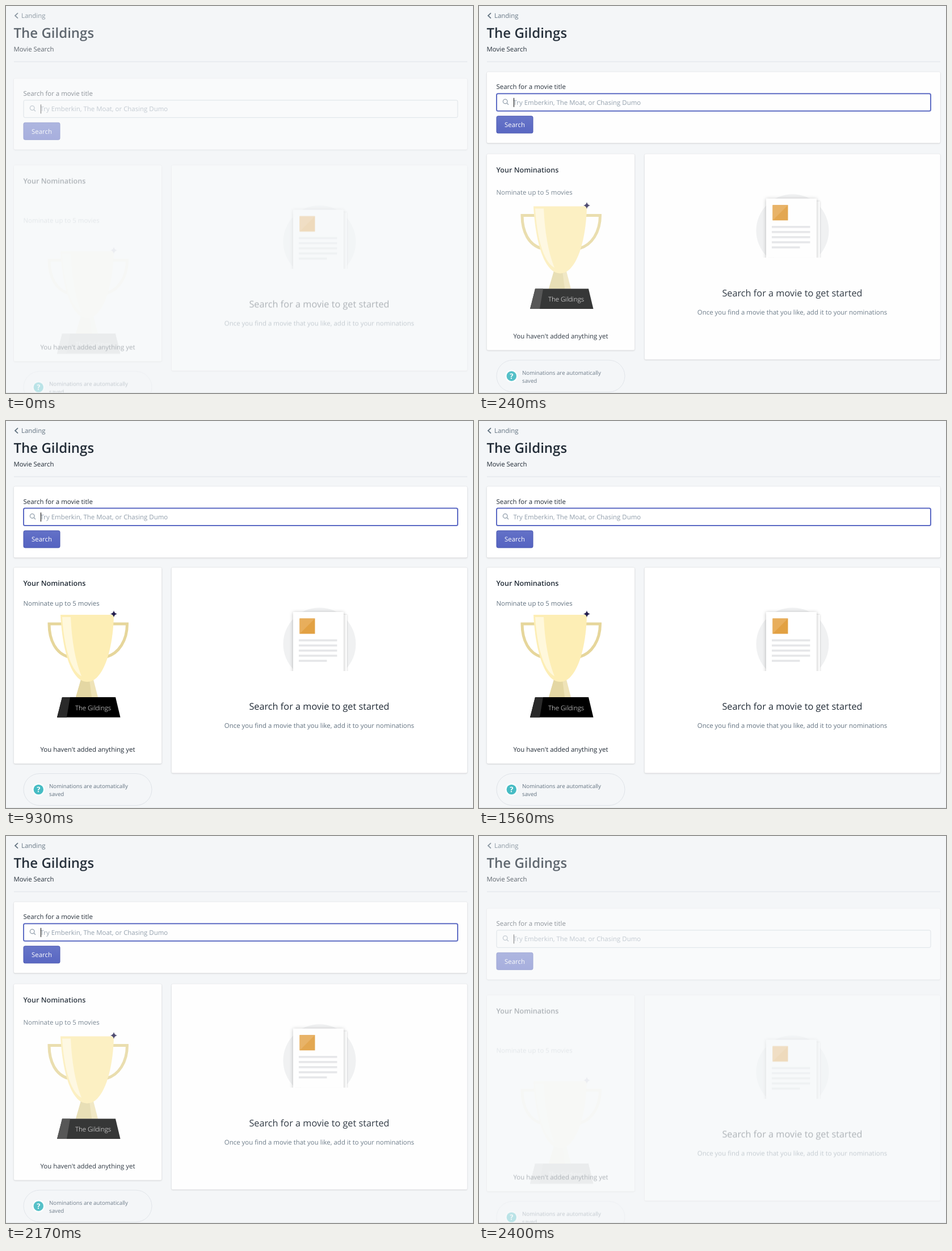
Animation, 823 px wide and 681 px high, one loop 2490 ms. Source, as an HTML page:

```html
<!DOCTYPE html>
<html lang="en">
<head>
<meta charset="utf-8">
<title>Movie search</title>
<style>
  html, body { margin: 0; width: 100%; height: 100%; overflow: hidden; background: #f4f6f8; }
  svg { display: block; width: 823px; height: 681px; }
  text { font: 11.45px "Open Sans", "Noto Sans", sans-serif; fill: #212b36; text-rendering: geometricPrecision; }
  .title { font-size: 24px; font-weight: 600; }
  .heading { font-size: 12.6px; font-weight: 600; }
  .lead { font-size: 16.3px; }
  .small { font-size: 9.73px; }
  .muted { fill: #637381; }
  .hint { fill: #919eab; }
  .light { fill: #fff; }
  .mid { text-anchor: middle; }
  .plaque { font-size: 11.5px; font-weight: 300; }
  .mark { font-size: 13px; font-weight: 700; }
  .card { fill: #fff; stroke: rgba(63, 63, 68, .06); filter: drop-shadow(0 1px 1.2px rgba(63, 63, 68, .17)); }
  .line { fill: none; }
</style>
</head>
<body>
<svg viewBox="0 0 823 681">
  <defs>
    <linearGradient id="buttonFill" x2="0" y2="1">
      <stop stop-color="#6371c7"/><stop offset="1" stop-color="#5563c1"/>
    </linearGradient>
    <clipPath id="paperClip"><rect x="480" y="320" width="150" height="120"/></clipPath>
  </defs>

  <path class="line" d="M14 98H813" stroke="#dfe3e8"/>

  <g id="header">
    <path class="line" d="M21 12.3 16 17l5 4.7" stroke="#637381" stroke-width="1.8"/>
    <text class="muted" x="27" y="21.3">Landing</text>
    <text class="title" x="13.5" y="56">The Gildings</text>
    <text x="13.5" y="79.5">Movie Search</text>
  </g>

  <g id="search">
    <rect class="card" x="13.5" y="115" width="799.5" height="125.5" rx="2.5"/>
    <text x="30.5" y="145.5">Search for a movie title</text>
    <rect x="31" y="153.5" width="765" height="30.5" rx="2.5" fill="#fff" stroke="#c4cdd5"/>
    <rect id="ring" class="line" x="31" y="153.5" width="765" height="30.5" rx="2.5" stroke="#5c6ac4" stroke-width="2"/>
    <g class="line" stroke="#919eab" stroke-width="1.3">
      <circle cx="46.2" cy="167.2" r="3.8"/><path d="m49 170 3 3"/>
    </g>
    <text class="hint" x="60.5" y="173">Try Emberkin, The Moat, or Chasing Dumo</text>
    <rect id="caret" x="61" y="161" width="1" height="16"/>
    <rect x="31" y="193" width="64" height="30" rx="2.5" fill="url(#buttonFill)" stroke="#4755b0"/>
    <text class="light mid" x="63" y="212.3">Search</text>
  </g>

  <g id="panels">
    <rect class="card" x="13.5" y="257.5" width="261" height="345.5" rx="2.5"/>
    <text class="heading" x="30.5" y="290">Your Nominations</text>
    <g id="nominate">
      <text class="muted" x="30.5" y="325.3">Nominate up to 5 movies</text>
      <g id="trophy">
        <g class="line" stroke="#e6d69b" stroke-width="5">
          <path d="M98 357H76C76 386 88 409 110 415"/>
          <path d="M188 357H213.500C213.500 386 199 409 177 415"/>
        </g>
        <path d="M132 455H154L162 486H123Z" fill="#efe3b7"/>
        <path d="M132 455H147L151 486H123Z" fill="#e4d7a3"/>
        <path d="M96 341H190C189 400 172 459 143 459 114 459 99 400 96 341Z" fill="#fdeeb5"/>
        <path d="M99 345H114C116 387 122 422 133 449 112 438 102 392 99 345Z" fill="#fff8dc"/>
        <path d="M99 486H193L201.500 521.500H90Z"/>
        <path d="M99 486H113L107 521.500H90Z" fill="#2a2a2a"/>
        <text class="plaque light mid" x="153.500" y="508.500">The Gildings</text>
        <path d="M190 333.500Q191 338.500 196 339.500 191 340.500 190 345.500 189 340.500 184 339.500 189 338.500 190 333.500Z" fill="#231f4e"/>
      </g>
    </g>
    <text class="mid" x="144" y="582">You haven't added anything yet</text>

    <rect class="card" x="291.5" y="257.5" width="521.5" height="362" rx="2.5"/>
    <g clip-path="url(#paperClip)">
      <circle cx="552.5" cy="392.5" r="64" fill="#f0f1f2"/>
      <path d="M520 341H601V460H520Z" fill="#fff" style="filter:drop-shadow(0 0 1.5px #0003)"/>
      <path d="M506 336H595V460H506Z" fill="#fff" style="filter:drop-shadow(0 1px 3px #0004)"/>
      <path d="M517.500 347.500h27v27h-27Z" fill="#e2a143"/>
      <path d="M517.500 347.500h27l-27 27Z" fill="#e8ae5c"/>
      <path class="line" d="M516 386h67.500M516 395h67.500M516 404h67.500M516 413h67.500M516 422h49.500" stroke="#e5e6e8" stroke-width="3.5"/>
    </g>
    <text class="lead mid" x="552" y="508">Search for a movie to get started</text>
    <text class="muted mid" x="552" y="540">Once you find a movie that you like, add it to your nominations</text>

    <rect class="line" x="31" y="620.5" width="226" height="56" rx="28" stroke="#dfe3e8"/>
    <circle cx="57.3" cy="648.5" r="11" fill="#fff"/>
    <circle cx="57.3" cy="648.5" r="8.7" fill="#47bcc4"/>
    <text class="mark light mid" x="57.3" y="653.2">?</text>
    <text class="small muted" x="76" y="646">Nominations are automatically</text>
    <text class="small muted" x="76" y="660">saved</text>
  </g>

  <path class="line" d="M0 680.5H823" stroke="#e4e7ea"/>
</svg>
<script>
  const LOOP = 2490;
  const REST = 5;
  const ENTER = [90, 160, 240, 320, 390];
  const LEAVE = [2100, 2170, 2250, 2330, 2400];

  // Nested layers: shift in pixels, missing opacity, and steps until settled.
  const LAYERS = [
    { id: "header", shift: 0, fade: 0.3, span: 4.5 },
    { id: "search", shift: 12.3, fade: 0.52, span: 4 },
    { id: "panels", shift: 22.4, fade: 0.67, span: 4.6 },
    { id: "nominate", shift: 34, fade: 0.6, span: 4.7 },
    { id: "trophy", shift: 34, fade: 0.6, span: 4.7 }
  ];

  const byId = id => document.getElementById(id);
  const passed = (times, t) => times.filter(time => t >= time).length;

  function render(t) {
    const step = passed(ENTER, t) - passed(LEAVE, t);
    for (const { id, shift, fade, span } of LAYERS) {
      const left = Math.max(0, 1 - step / span) ** 2;
      const layer = byId(id);
      layer.setAttribute("transform", `translate(0 ${(shift * left).toFixed(2)})`);
      layer.setAttribute("opacity", 1 - fade * left);
    }
    byId("ring").setAttribute("opacity", Math.min(1, step / 1.5));
    const caretOn = step < REST || (t >= 930 && t < 1560);
    byId("caret").setAttribute("opacity", caretOn ? 1 : 0);
  }

  const start = performance.now();
  function tick() {
    render((performance.now() - start) % LOOP);
    requestAnimationFrame(tick);
  }
  render(0);
  requestAnimationFrame(tick);
</script>
</body>
</html>
```
